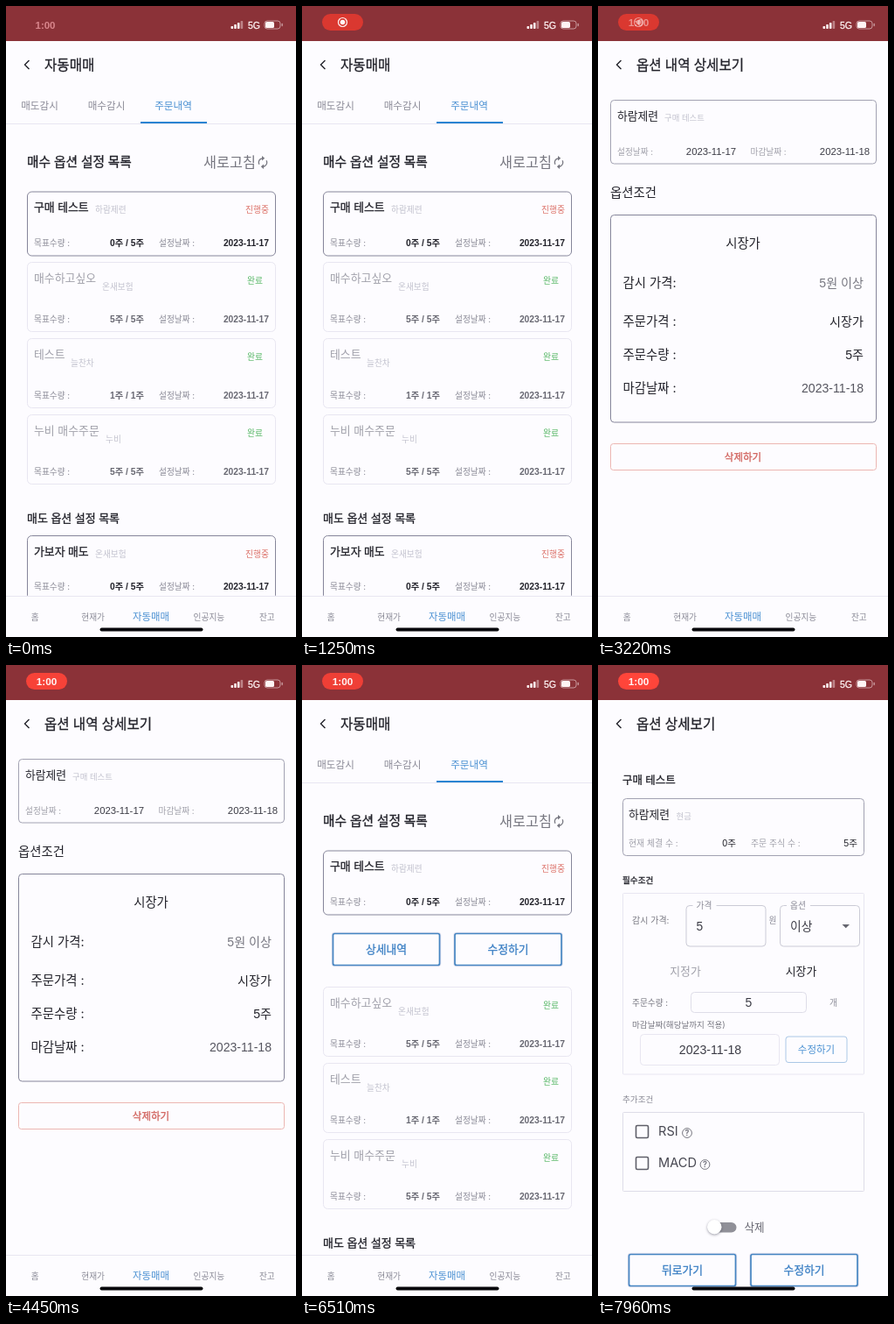
These frames come from a looping animation (332x720 px, 7.99 s). An HTML page with a canvas:

```html
<!DOCTYPE html>
<html lang="ko">
<head>
<meta charset="utf-8">
<title>자동매매</title>
<style>
html, body { margin: 0; width: 100%; height: 100%; overflow: hidden; background: #fdfcff; }
canvas { display: block; width: 332px; height: 720px; }
</style>
</head>
<body>
<canvas id="stage"></canvas>
<script>
const W = 332, H = 720, LOOP = 7990;
const HANGUL = '"Noto Sans CJK KR", "Noto Sans CJK", sans-serif';
const FONT = `Inter, ${HANGUL}`;
const DIGITS = `"Liberation Sans", ${HANGUL}`; // equal-width figures
const C = {
  bg: '#fdfcff', bar: '#8b3238', ink: '#22222a', dark: '#3c3c46', mid: '#8a8a96',
  soft: '#a0a0aa', pale: '#c2c2ce', line: '#e8e6f1', rim: '#cbcbd6', edge: '#85859a',
  gray: '#777780', blue: '#3b7fc4', active: '#4a90d2', orange: '#dc7168', green: '#55b764',
  light: '#fff4f4'
};
const BUY = { title: '구매 테스트', stock: '하람제련' };

const canvas = document.getElementById('stage');
const ctx = canvas.getContext('2d');
const dpr = window.devicePixelRatio || 1;
canvas.width = W * dpr;
canvas.height = H * dpr;

const clamp = v => Math.max(0, Math.min(1, v));
const ease = v => v * v * (3 - 2 * v);
const ramp = (t, start, length) => ease(clamp((t - start) / length));

// y is the optical middle of the line; weight 500 gets a hairline outline
function text(str, x, y, size, color = C.ink, align = 'left', weight = 400) {
  const base = y + size * 0.365;
  ctx.font = `${weight} ${size}px ${/^\d/.test(str) ? DIGITS : FONT}`;
  ctx.textAlign = align;
  ctx.fillStyle = color;
  ctx.fillText(str, x, base);
  if (weight === 500) {
    ctx.strokeStyle = color;
    ctx.lineWidth = 0.3;
    ctx.strokeText(str, x, base);
  }
}

function shape(x, y, w, h, r, fill) {
  ctx.beginPath();
  ctx.roundRect(x, y, w, h, r);
  ctx.fillStyle = fill;
  ctx.fill();
}

function frame(x, y, w, h, r, color, width = 1) {
  ctx.beginPath();
  ctx.roundRect(x + 0.5, y + 0.5, w - 1, h - 1, r);
  ctx.strokeStyle = color;
  ctx.lineWidth = width;
  ctx.stroke();
}

function polygon(points, color) {
  ctx.beginPath();
  points.forEach(([x, y]) => ctx.lineTo(x, y));
  ctx.fillStyle = color;
  ctx.fill();
}

function ring(x, y, r, color, width = 1, from = 0, to = Math.PI * 2) {
  ctx.beginPath();
  ctx.arc(x, y, r, from, to);
  ctx.strokeStyle = color;
  ctx.lineWidth = width;
  ctx.stroke();
}

function faded(alpha, draw) {
  if (alpha <= 0) return;
  ctx.save();
  ctx.globalAlpha *= alpha;
  draw();
  ctx.restore();
}

function recordPill(t) {
  const pulse = 0.5 - 0.5 * Math.cos((t - 1250) / 1930 * Math.PI * 2);
  const mix = (a, b) => Math.round(a + (b - a) * pulse);
  const shown = ramp(t, 0, 600);
  const toTime = ramp(t, 3000, 450);
  faded(1 - shown, () => text('1:00', 45, 21.5, 11.5, '#d9868c', 'center', 600));
  faded(shown, () => {
    shape(23, 9, 47, 19, 9.5, `rgb(${mix(218, 255)},${mix(56, 69)},${mix(48, 58)})`);
    faded(toTime, () => text('1:00', 46.5, 18.5, 11.8, C.light, 'center', 600));
    faded(1 - toTime, () => {
      ring(46.5, 18.5, 5, C.light, 1.2);
      shape(43.7, 15.7, 5.6, 5.6, 2.8, C.light);
    });
  });
}

function statusBar(t) {
  shape(0, 0, W, 40, 0, C.bar);
  recordPill(t);
  for (let i = 0; i < 4; i++) {
    const h = 3 + i * 2;
    shape(257.5 + i * 3.7, 26 - h, 2.6, h, 0.7, i < 3 ? C.light : '#bd8488');
  }
  text('5G', 277, 21.8, 10.5, C.light, 'left', 500);
  frame(295.5, 16.5, 19, 10, 3, '#c8989c');
  shape(297, 18, 10, 7, 1.6, C.light);
  shape(315.5, 19.8, 1.4, 3.5, 0.7, '#c8989c');
}

function header(title) {
  ctx.beginPath();
  ctx.moveTo(26.5, 62);
  ctx.lineTo(21.5, 67);
  ctx.lineTo(26.5, 72);
  ctx.strokeStyle = C.ink;
  ctx.lineWidth = 1.4;
  ctx.stroke();
  text(title, 44, 67, 15.6, C.ink, 'left', 500);
}

function homeBar() {
  shape(107.5, 709.5, 118, 4, 2, '#08080c');
}

function bottomNav() {
  shape(0, 673, W, 47, 0, C.bg);
  shape(0, 673, W, 1, 0, C.line);
  ['홈', '현재가', '자동매매', '인공지능', '잔고'].forEach((label, i) => {
    const on = i === 2;
    text(label, 33.2 + i * 66.4, 697, on ? 11.4 : 9.7, on ? C.active : C.mid, 'center');
  });
}

function button(label, x, y, press = 0) {
  frame(x - 1, y - 1, 125, 39, 3, '#e2e1ee', 1.5);
  frame(x, y, 123, 37, 2, '#4585c2', 1.7);
  faded(press, () => shape(x, y, 123, 37, 2, '#6396c8'));
  text(label, x + 61.5, y + 18.5, 12.8, C.blue, 'center', 500);
}

function orderCard(y, o) {
  const { title, stock, subX, count, done } = o;
  frame(24, y, 285, done ? 80 : 74, 5, done ? C.line : C.edge);
  text(title, 32, y + 18, 12.9, done ? C.soft : C.ink, 'left', done ? 400 : 500);
  text(stock, subX, y + (done ? 28 : 21), 9.7, C.pale);
  if (done) text('완료', 294, y + 21, 9.8, C.green, 'right');
  else text('진행중', 301, y + 21, 9.8, C.orange, 'right');
  const row = y + (done ? 65 : 58.5), ink = done ? '#686872' : C.ink;
  text('목표수량 :', 32, row, 9.7, C.mid);
  text(count, 158, row, 10.3, ink, 'right', 600);
  text('설정날짜 :', 175, row, 9.7, C.mid);
  text('2023-11-17', 301, row, 10.3, ink, 'right', 600);
}

function refreshIcon(x, y) {
  const half = Math.PI / 2;
  for (const s of [1, -1]) {
    const from = s > 0 ? -0.5 : Math.PI - 0.5;
    ring(x, y, 4.7, C.gray, 1.3, from, from + half + 0.5);
    polygon([[x + s, y + s * 2], [x - s * 2.2, y + s * 4.7], [x + s, y + s * 7.4]], C.gray);
  }
}

const DONE = [
  { title: '매수하고싶오', stock: '온새보험', subX: 110, count: '5주 / 5주', done: true },
  { title: '테스트', stock: '늘찬차', subX: 74, count: '1주 / 1주', done: true },
  { title: '누비 매수주문', stock: '누비', subX: 114, count: '5주 / 5주', done: true }
];

function listPage(open, pressLeft, pressRight) {
  header('자동매매');
  ['매도감시', '매수감시', '주문내역'].forEach((label, i) =>
    text(label, 38.5 + i * 76.5, 113.5, 11.6, i === 2 ? C.active : C.mid, 'center'));
  shape(0, 134, W, 1, 0, C.line);
  shape(154, 132, 76, 2, 0, '#2a84d2');
  text('매수 옵션 설정 목록', 24, 178, 14.7, C.ink, 'left', 500);
  text('새로고침', 226, 178, 16.3, C.gray);
  refreshIcon(294, 178.5);

  orderCard(211.5, { ...BUY, subX: 102, count: '0주 / 5주' });
  const shift = 75 * open;
  if (open > 0) {
    ctx.save();
    ctx.beginPath();
    ctx.rect(0, 287, W, shift + 4);
    ctx.clip();
    button('상세내역', 35, 306, pressLeft);
    button('수정하기', 174.5, 306, pressRight);
    ctx.restore();
  }
  DONE.forEach((o, i) => orderCard(292 + shift + i * 87, o));
  text('매도 옵션 설정 목록', 24, 584 + shift, 13, C.ink, 'left', 500);
  orderCard(604 + shift, { title: '가보자 매도', stock: '온새보험', subX: 102, count: '0주 / 5주' });
  bottomNav();
}

function detailPage() {
  header('옵션 내역 상세보기');
  frame(14, 107, 305, 73.5, 4, '#a2a2b2');
  text(BUY.stock, 22, 125, 12.8);
  text(BUY.title, 76, 128, 9.4, C.pale);
  text('설정날짜 :', 22, 166, 9.7, C.soft);
  text('2023-11-17', 158, 166, 11.35, C.dark, 'right');
  text('마감날짜 :', 174.5, 166, 9.7, C.soft);
  text('2023-11-18', 311, 166, 11.35, C.dark, 'right');
  text('옵션조건', 14, 212.5, 14.4);

  frame(14, 238, 305, 237.5, 4, C.edge);
  text('시장가', 166, 271, 14.4, C.ink, 'center');
  [
    ['감시 가격:', '5원 이상', 315.5, C.gray],
    ['주문가격 :', '시장가', 360, C.ink],
    ['주문수량 :', '5주', 398, C.ink],
    ['마감날짜 :', '2023-11-18', 435.5, '#55555f']
  ].forEach(([label, value, y, color]) => {
    text(label, 28.5, y, 14.4);
    text(value, 304, y, 14.1, color, 'right');
  });
  frame(14, 499, 305, 31, 3, '#ecb6b2');
  text('삭제하기', 166, 515, 11.5, '#d0605a', 'center', 500);
  bottomNav();
}

function field(x, label, value) {
  frame(x, 274, 92, 47.5, 4, C.rim);
  shape(x + 8, 272, 27, 5, 0, C.bg);
  text(label, x + 12, 274, 9.7, C.mid);
  text(value, x + 12, 298, 13.8, C.dark);
}

function check(label, y, iconX) {
  frame(43, y - 7, 15, 15, 1.5, '#5f5f69', 1.6);
  text(label, 69, y, 14.6, '#484852');
  ring(iconX, y + 2, 5.4, C.gray);
  text('?', iconX, y + 2, 8.5, C.gray, 'center', 500);
}

function editPage() {
  header('옵션 상세보기');
  text(BUY.title, 28, 131, 12.5, C.ink, 'left', 500);
  frame(28, 152, 277, 66, 4, '#a2a2b2');
  text(BUY.stock, 35, 170, 12.8);
  text('현금', 89.5, 172.5, 9.4, C.pale);
  text('현재 체결 수 :', 35, 203, 9.9, C.soft);
  text('0주', 158, 203, 10.6, C.ink, 'right');
  text('주문 주식 수 :', 175, 203, 9.9, C.soft);
  text('5주', 297, 203, 10.6, C.ink, 'right');

  text('필수조건', 28, 245, 9.6, C.ink, 'left', 500);
  frame(28, 260, 277, 207.5, 1, C.line);
  text('감시 가격:', 39, 291, 10, C.gray);
  field(100.5, '가격', '5');
  text('원', 195.5, 291, 9.7, C.mid);
  field(208, '옵션', '이상');
  polygon([[279.5, 296], [288, 296], [283.75, 300.3]], '#666670');

  text('지정가', 100, 349.5, 12.9, C.soft, 'center');
  text('시장가', 232.5, 349.5, 12.9, C.ink, 'center');
  text('주문수량 :', 39, 385, 9.7, C.gray);
  frame(106, 373, 133, 24, 4, '#dedde8');
  text('5', 172.5, 385, 14, C.dark, 'center');
  text('개', 265, 385, 9.7, C.mid);
  text('마감날짜(해당날까지 적용)', 39, 410.5, 9.6, C.gray);
  frame(48, 421, 160, 36, 4, C.line);
  text('2023-11-18', 128.5, 439, 14.2, C.dark, 'center');
  frame(214.5, 423.5, 71, 30.5, 3, '#abc8e6');
  text('수정하기', 250, 439, 11.5, C.active, 'center');

  text('추가조건', 28, 495, 9.6, C.mid);
  frame(28, 510, 277, 91, 1, '#dedde8');
  check('RSI', 532, 102);
  check('MACD', 568, 122.5);

  shape(132, 636, 26.5, 11.5, 5.75, '#909098');
  ctx.save();
  ctx.shadowColor = 'rgba(40,40,60,.45)';
  ctx.shadowBlur = 3 * dpr;
  ctx.shadowOffsetY = dpr;
  shape(125, 633, 16.5, 16.5, 8.25, '#ffffff');
  ctx.restore();
  text('삭제', 167.5, 641.5, 12.6, '#666670');
  button('뒤로가기', 35, 672);
  button('수정하기', 174.5, 672);
}

function draw(t) {
  ctx.setTransform(dpr, 0, 0, dpr, 0, 0);
  shape(0, 0, W, H, 0, C.bg);
  if (t < 2700) listPage(ramp(t, 1750, 250), ramp(t, 2500, 120), 0);
  else if (t < 5150) detailPage();
  else if (t < 7140) listPage(ramp(t, 6250, 250), 0, ramp(t, 6900, 120));
  else editPage();
  homeBar();
  statusBar(t);
}

const start = performance.now();
function tick() {
  draw((performance.now() - start) % LOOP);
  requestAnimationFrame(tick);
}
tick();
</script>
</body>
</html>
```
